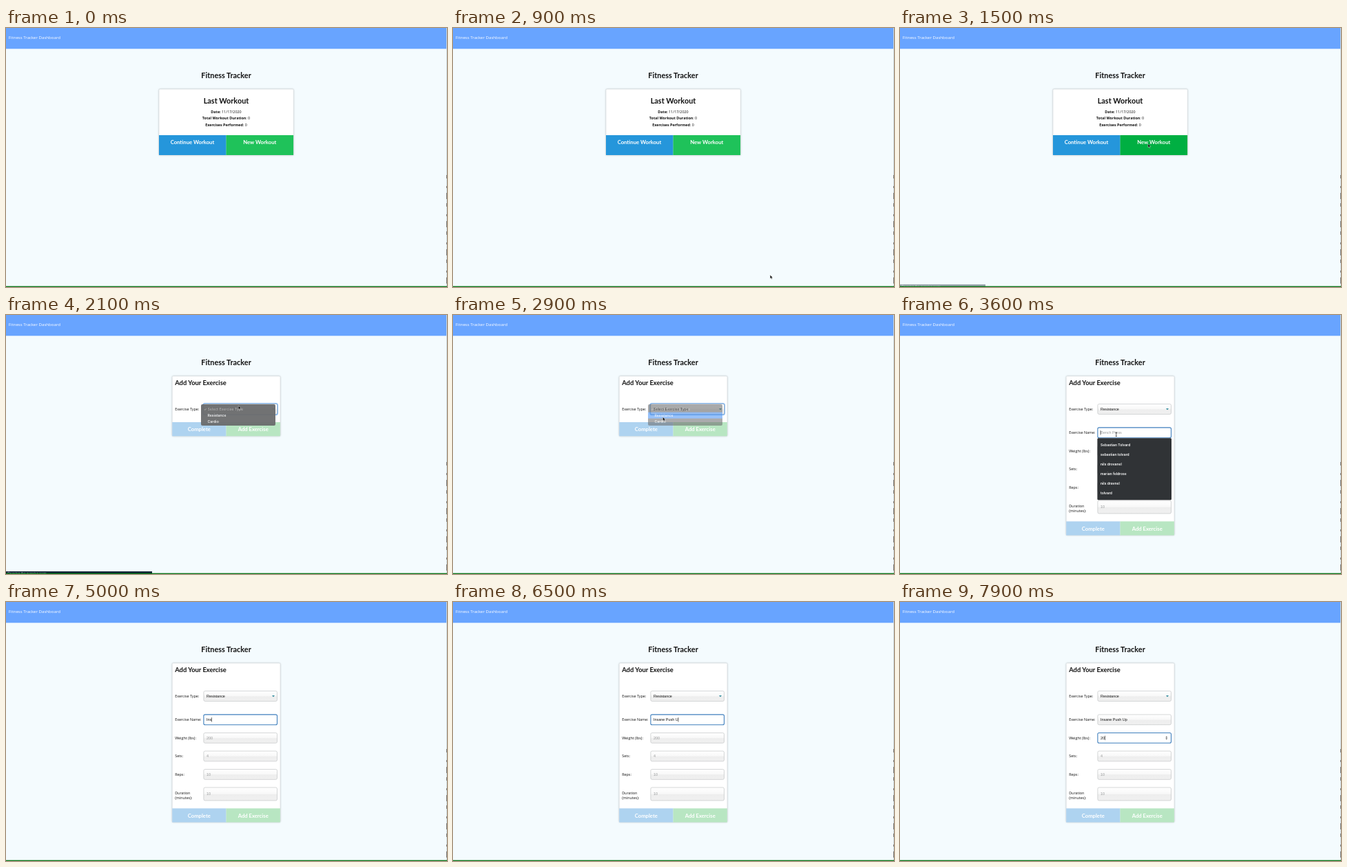
Write an HTML page that moves like this. It is 640 by 377 pixels and loops after 8 s.

```html
<!DOCTYPE html>
<html lang="en">
<head>
<meta charset="utf-8">
<title>Fitness Tracker</title>
<style>
  html, body { margin: 0; width: 100%; height: 100%; overflow: hidden; background: #f4fbfe; }
  svg { display: block; width: 640px; height: 377px; }
  text { font: 5.4px "Open Sans", "Noto Sans", sans-serif; fill: #111; white-space: pre; }
  .mid { text-anchor: middle; }
  .bold { font-weight: 700; }
  .h1, .h2, .btn { font-family: Lato, sans-serif; font-weight: 700; }
  .h1 { font-size: 10.9px; }
  .h2 { font-size: 9.4px; }
  .btn { font-size: 7.7px; fill: #fff; }
  .value { font: 5.45px "Liberation Sans", Arial, sans-serif; }
  .menu text { font: 500 5.2px Inter, sans-serif; fill: #fff; }
  .hints text { font: 600 5px Inter, sans-serif; fill: #fff; }
  .card { fill: #fff; stroke: #d3dadd; stroke-width: .6; filter: drop-shadow(0 .6px .8px #0003); }
  .box { fill: url(#shine); stroke: #b9bcbe; stroke-width: .6; }
  .focus .box { fill: #fff; stroke: #3f7fbd; stroke-width: 1.1; }
</style>
</head>
<body>
<svg viewBox="0 0 640 377">
  <defs>
    <linearGradient id="shine" x2="0" y2="1">
      <stop offset="0" stop-color="#fff"/>
      <stop offset=".48" stop-color="#f8f8f8"/>
      <stop offset=".55" stop-color="#eee"/>
      <stop offset="1" stop-color="#f0f0f0"/>
    </linearGradient>
  </defs>
  <rect width="640" height="377" fill="#f4fbfe"/>
  <rect width="640" height="30.3" fill="#68a4ff"/>
  <text x="3.8" y="15.7" style="font-size:6.12px;fill:#fff">Fitness Tracker Dashboard</text>
  <text class="h1 mid" x="319.5" y="72.8">Fitness Tracker</text>

  <g id="home">
    <rect class="card" x="222" y="89" width="195.3" height="96.2" rx="1.5"/>
    <text class="h1 mid" x="319.5" y="109.8">Last Workout</text>
    <text class="mid" x="319.5" y="124"><tspan class="bold">Date:</tspan> 11/17/2020</text>
    <text class="mid" x="319.5" y="133.4"><tspan class="bold">Total Workout Duration</tspan>: 0</text>
    <text class="mid" x="319.5" y="142.9"><tspan class="bold">Exercises Performed</tspan>: 0</text>
    <rect x="222" y="156" width="97.6" height="29" fill="#2596db"/>
    <rect id="newBtn" x="319.5" y="156" width="97.6" height="29"/>
    <text class="btn mid" x="270.5" y="169.3">Continue Workout</text>
    <text class="btn mid" x="368.3" y="169.3">New Workout</text>
  </g>

  <g id="exercise">
    <rect id="card" class="card" x="241.2" y="89" width="156.8" rx="1.5"/>
    <text class="h2" x="245.2" y="102.3">Add Your Exercise</text>
    <g id="buttons">
      <rect x="241.2" y="156" width="78.4" height="20.3" fill="#aed3f0"/>
      <rect x="319.5" y="156" width="78.4" height="20.3" fill="#b8e6c2"/>
      <text class="btn mid" x="280.3" y="169.2">Complete</text>
      <text class="btn mid" x="358.7" y="169.2">Add Exercise</text>
    </g>
    <text x="245.2" y="139.2">Exercise Type:</text>
    <rect id="ring" x="286.2" y="129" width="107.8" height="16" rx="2.6" fill="none" stroke="#7fb3ec" stroke-width="2"/>
    <rect class="box" x="286.9" y="129.6" width="106.6" height="14.8" rx="2"/>
    <text id="type" class="value" x="291" y="138.9"></text>
    <path d="M386 136h4l-2 2.3z" fill="#2f8a9c"/>
    <g id="fields"></g>
    <rect id="caret" width=".6" height="6.4" fill="#111"/>
    <g id="hints" class="hints">
      <rect x="286.4" y="179.3" width="107.6" height="90" rx="1.5" fill="#303336"/>
    </g>
    <g id="menu" class="menu">
      <rect x="283" y="130" width="108" height="31" rx="2" fill="#6b6c6d"/>
      <rect id="pick" x="283" y="141.6" width="108" height="9" fill="#4a92f3"/>
      <text x="287" y="139" style="fill:#b2b2b2">✓</text>
      <text x="292.5" y="139" style="fill:#b2b2b2">Select Exercise Type</text>
      <text x="292.5" y="148">Resistance</text>
      <text x="292.5" y="157">Cardio</text>
    </g>
  </g>

  <g id="status">
    <rect id="statusBar" y="373.2" height="4" fill="#0c1e30"/>
    <text x="2" y="378" style="font-size:4.6px;fill:#dde">Opening the exercise page</text>
  </g>
  <path d="M639.5 0V376" stroke="#cbd5da" stroke-width="1"/>
  <path d="M639.6 214V376" stroke="#4d4a42" stroke-width=".8" stroke-dasharray="5 11 3 7 9 6"/>
  <rect y="375.7" width="640" height="1.3" fill="#0b7418"/>
  <path id="arrow" d="M0 0V5.4L1.2 4.3 2 6.2 3 5.8 2.2 4H3.8Z" fill="#000" stroke="#fff" stroke-width=".4"/>
  <path id="beam" d="M-1.2-3Q0-3 0-2.2 0-3 1.2-3M0-2.2V2.2M-1.2 3Q0 3 0 2.2 0 3 1.2 3" fill="none" stroke="#222" stroke-width=".7"/>
</svg>
<script>
const LOOP = 8000;
const $ = id => document.getElementById(id);
const show = (id, on) => { $(id).style.display = on ? '' : 'none'; };
const ramp = (t, a, b) => Math.min(1, Math.max(0, (t - a) / (b - a)));

// label, top, height, placeholder
const fields = [
  ['Exercise Name:', 163.9, 14.8, 'Bench Press'],
  ['Weight (lbs):', 190.5, 14.8, '200'],
  ['Sets:', 217, 14.8, '4'],
  ['Reps:', 243.5, 14.8, '10'],
  ['Duration', 270, 19, '10']
];
$('fields').innerHTML = fields.map(([label, y, h], i) => {
  const mid = y + h / 2;
  const base = mid + (i === 4 ? .4 : 2);
  return `<g id="field${i}"><text x="245.2" y="${base}">${label}</text>
    <rect class="box" x="286.9" y="${y}" width="106.6" height="${h}" rx="2"/>
    <text id="value${i}" class="value" x="291" y="${mid + 1.9}"></text></g>`;
}).join('') + `<text x="245.2" y="287.2">(minutes):</text>
  <path id="spinner" d="M385.4 197.3l1.4-1.8 1.4 1.8zM385.4 198.5l1.4 1.8 1.4-1.8z" fill="#444"/>`;

const people = ['Sebastian Tolvard', 'sebastian tolvard', 'nils drovanel', 'marian feldrose', 'nils dravnel', 'tolvard'];
$('hints').innerHTML += people.map((p, i) => `<text x="291" y="${191 + i * 14}">${p}</text>`).join('');

const nameKeys = [4500, 4700, 5000, 5100, 5300, 5500, 5700, 5850, 6000, 6150, 6300, 6400, 6500, 6600];
const weightKeys = [7800, 7900];
const typed = (text, keys, t) => text.slice(0, keys.filter(k => k <= t).length);

// time, x, y of the pointer
const path = [
  [800, 470, 378], [1350, 360, 168.5], [1700, 360, 168.5], [2000, 337.3, 132],
  [2350, 337.3, 132], [2700, 304.5, 148.5], [3000, 304.5, 148.5], [3400, 313.8, 173.8]
];
function pointer(t) {
  let i = 0;
  while (i < path.length - 2 && t > path[i + 1][0]) i++;
  const [a, b] = [path[i], path[i + 1]];
  const k = ramp(t, a[0], b[0]);
  const e = k * k * (3 - 2 * k);
  return [a[1] + (b[1] - a[1]) * e, a[2] + (b[2] - a[2]) * e];
}

function setValue(i, text) {
  const el = $('value' + i);
  el.textContent = text || fields[i][3];
  el.style.fill = text ? '#111' : '#969899';
}

function drawCaret(t, name, weight) {
  const active = t < 7000 ? 0 : 1;
  const text = active ? weight : name;
  const keys = [3400, ...nameKeys, 7000, ...weightKeys];
  const idle = t - keys.filter(k => k <= t).pop();
  show('caret', t >= 3400 && idle % 1000 < (t < 4500 ? 700 : 500));
  $('caret').setAttribute('x', 291 + (text ? $('value' + active).getComputedTextLength() : -.3));
  $('caret').setAttribute('y', fields[active][1] + 4.2);
}

function draw(t) {
  const [x, y] = pointer(t);
  const open = t >= 3000;

  show('home', t < 1700);
  show('exercise', t >= 1700);
  $('newBtn').style.fill = t >= 1300 ? '#00af42' : '#1fc25a';

  $('card').setAttribute('height', open ? 231.5 : 87.3);
  $('buttons').setAttribute('transform', `translate(0 ${open ? 144.4 : 0})`);
  show('fields', open);
  show('ring', t >= 2050 && t < 3400);
  $('type').textContent = open ? 'Resistance' : 'Select Exercise Type';

  show('menu', t >= 2050 && t < 3000);
  $('menu').style.opacity = .95 * (1 - ramp(t, 2800, 3050));
  show('pick', y > 142);
  show('hints', t >= 3500 && t < 4500);

  const name = typed('Insane Push Up', nameKeys, t);
  const weight = typed('20', weightKeys, t);
  fields.forEach((f, i) => setValue(i, [name, weight][i]));
  $('field0').classList.toggle('focus', t >= 3400 && t < 7000);
  $('field1').classList.toggle('focus', t >= 7000);
  show('spinner', t >= 7000);
  drawCaret(t, name, weight);

  $('status').style.opacity = ramp(t, 1400, 1650) * (1 - ramp(t, 2300, 2500));
  $('statusBar').setAttribute('width', t < 1700 ? 124 : 212);

  const inField = y > 164 && open;
  show('arrow', t >= 800 && t < 4500 && !inField);
  show('beam', t < 4500 && inField);
  for (const id of ['arrow', 'beam']) $(id).setAttribute('transform', `translate(${x} ${y})`);
}

const start = performance.now();
function tick() {
  draw((performance.now() - start) % LOOP);
  requestAnimationFrame(tick);
}
tick();
</script>
</body>
</html>
```
